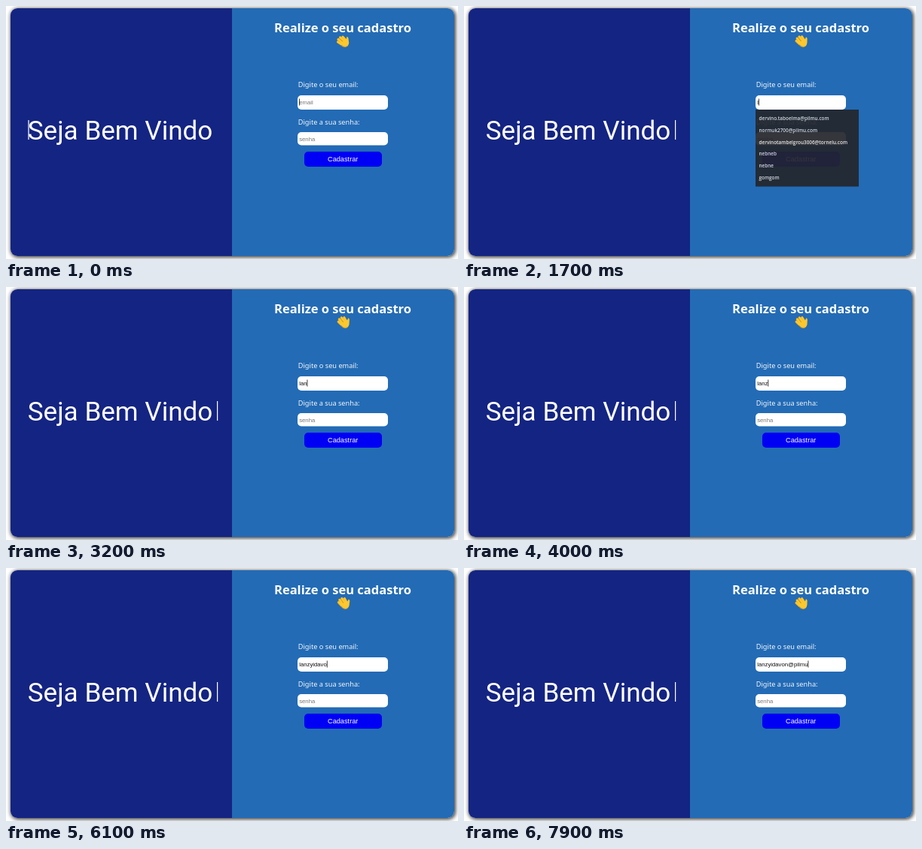
These frames come from a looping animation (600x337 px, 8000 ms). An HTML page:

```html
<!DOCTYPE html>
<html lang="pt">
<head>
<meta charset="utf-8">
<style>
  html, body { margin: 0; width: 100%; height: 100%; overflow: hidden; background: #fff; }
  .card {
    position: absolute; left: 6px; top: 3px; width: 589px; height: 330px; border-radius: 9px;
    background: linear-gradient(90deg, #142482 294px, #236bb5 294px);
    box-shadow: 1px 1px 5px 1px rgba(0, 0, 0, .75);
  }
  svg { position: absolute; left: 0; top: 0; width: 600px; height: 337px; }
  text { white-space: pre; }
  .welcome { font: 35.1px Roboto, sans-serif; fill: #fff; }
  .title { font: bold 16.5px "Noto Sans", sans-serif; fill: #fff; text-anchor: middle; }
  .label { font: 9.2px "Noto Sans", sans-serif; fill: #f2f6fb; }
  .field { font: 7.75px "Liberation Sans", Arial, sans-serif; fill: #111; }
  .hint { fill: #777; }
  .button { font: 9.2px "Liberation Sans", Arial, sans-serif; fill: #fff; text-anchor: middle; }
  #list text { font: 600 6.4px "Open Sans", sans-serif; fill: #e4e4e6; }
</style>
</head>
<body>
<div class="card"></div>
<svg viewBox="0 0 600 337">
  <text class="welcome" x="28.8" y="178">Seja Bem Vindo</text>
  <rect id="cursor" y="152" width="1.2" height="26" fill="#fff"/>

  <text class="title" x="447" y="34.7">Realize o seu cadastro</text>
  <g id="hand" stroke-linecap="round" fill="none">
    <path d="M441 44.5l5.5 5M443.5 42l6 5.500M447 41.200l4.500 5M440.500 48l4.500 3" stroke="#e9a51d" stroke-width="3.300"/>
    <path d="M441 44.200l5.500 5M443.500 41.700l6 5.500M447 41l4.500 5M440.500 47.700l4.500 3" stroke="#fcc82f" stroke-width="2.400"/>
    <path d="M444 49.500L451 44.500Q452.500 43 452.300 41Q454.700 40.800 454.700 45Q456.500 53 451.500 54.300Q447 55 444 50Z" fill="#fcc82f"/>
    <path d="M446 53Q449.500 55.500 453 53.200" stroke="#e9a51d"/>
  </g>

  <text class="label" x="387.800" y="108">Digite o seu email:</text>
  <rect x="387" y="119" width="120" height="19" rx="5" fill="#fff"/>
  <text class="field" id="email" x="389.200" y="131"></text>
  <rect id="caret" y="123.500" width=".8" height="9" fill="#111"/>

  <text class="label" x="387.800" y="157.500">Digite a sua senha:</text>
  <rect x="387" y="168" width="120" height="17.500" rx="5" fill="#fff"/>
  <text class="field hint" x="389.200" y="179.500">senha</text>
  <rect x="396" y="194" width="103" height="20" rx="5" fill="#0000f5"/>
  <text class="button" x="447.200" y="207.300">Cadastrar</text>

  <g id="list"><rect x="387" y="138" width="137" height="102.500" fill="#24262c"/></g>
</svg>
<script>
  const LOOP = 8000;
  const TYPED = "lanzyidavon@pilmu";
  const KEYS = [1700, 2400, 2900, 3900, 4600, 4900, 5200, 5500, 5800, 6000,
                6300, 6800, 7000, 7200, 7400, 7600, 7800];
  const SUGGESTIONS = ["dervino.taboelma@pilmu.com", "normuk2700@pilmu.com",
    "dervinotambelgrou3006@tornelu.com", "nebneb", "nebne", "gomgom"];

  const $ = id => document.getElementById(id);
  const clamp = v => Math.max(0, Math.min(1, v));
  const email = $("email"), caret = $("caret"), list = $("list");

  SUGGESTIONS.forEach((s, i) => {
    const row = document.createElementNS("http://www.w3.org/2000/svg", "text");
    row.setAttribute("x", 391.5);
    row.setAttribute("y", 152 + i * 15.8);
    row.textContent = s;
    list.append(row);
  });

  function draw(t) {
    // The welcome cursor advances one letter slot at a time.
    const slot = Math.min(14, Math.floor(t / 1100 * 14));
    $("cursor").setAttribute("x", 29.4 + slot * 17.9);

    const angle = 7 - 7 * Math.cos(t / 2400 * 2 * Math.PI);
    $("hand").setAttribute("transform", `rotate(${angle} 450 51)`);

    const count = KEYS.filter(k => k <= t).length;
    email.textContent = count ? TYPED.slice(0, count) : "email";
    email.classList.toggle("hint", !count);
    const width = count ? email.getComputedTextLength() : 0;
    caret.setAttribute("x", 389.2 + width);

    // Each key press restarts the caret blink.
    const idle = t - (count ? KEYS[count - 1] : 0);
    caret.setAttribute("opacity", idle % 1000 < 500 ? 1 : 0);

    list.setAttribute("opacity", clamp((t - 400) / 200) * clamp((1960 - t) / 280));
  }

  function frame(now) {
    draw(now % LOOP);
    requestAnimationFrame(frame);
  }
  draw(0);
  requestAnimationFrame(frame);
</script>
</body>
</html>
```
